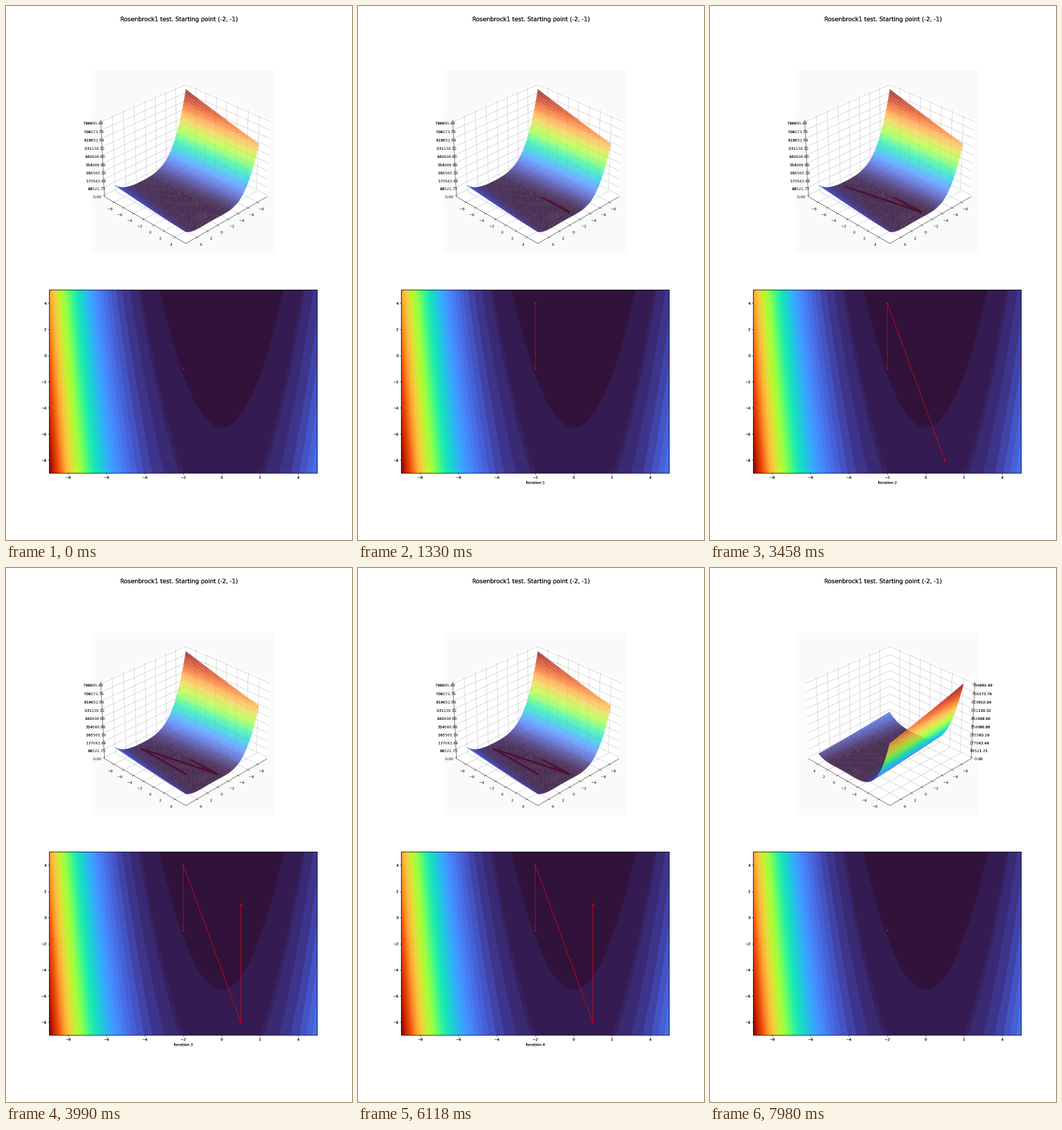
These frames come from a looping animation (603x928 px, 8000 ms). A matplotlib script:

```python
import numpy as np
import matplotlib.pyplot as plt
from matplotlib.animation import FuncAnimation
from matplotlib.artist import Artist

WIDTH, HEIGHT, DPI = 603, 928, 64
FINE = 2                   # scenes are drawn larger, then averaged down
S = 0.725                  # scale of points on this stage
LOOP, STEP, HOLD = 8000, 20, 1330
LAYERS = 4                 # axes stacked on each other thicken the outer text
LOW, HIGH = -9, 5
ZMAX = 9 * 88521.7206
TITLE = "Rosenbrock1 test. Starting point (-2, -1)"
PATH = np.array([(-2, -1), (-2, 4), (1, -8), (1, 1)])
TICKS = range(-8, 5, 2)

plt.rcParams.update({
    "font.family": "DejaVu Sans",
    "font.size": 10 * S,
    "axes.linewidth": 0.8 * S,
    "axes.labelpad": 4 * S,
    "grid.linewidth": 0.8 * S,
    **{f"{a}tick.major.{k}": v * S for a in "xy"
       for k, v in (("size", 3.5), ("pad", 3.5), ("width", 0.8))},
})


def cost(x, y):
    return 100 * (x**2 - y)**2 + (1 - x)**2


def mesh(low, n):
    line = np.linspace(low, HIGH, n)
    x, y = np.meshgrid(line, line)
    return x, y, cost(x, y)


def padded(low, high, part):
    pad = (high - low) * part
    return low - pad, high + pad


SURFACE = mesh(-8.96, 141)
FIELD = mesh(LOW, 300)
LEVELS = np.concatenate([[0, 3060, 16550, 19600, 32600],
                         np.arange(48800, 815000, 16270)])
XY_LIM = padded(*padded(LOW, HIGH, 0.05), 1 / 48)
Z_LIM = padded(0, ZMAX, 1 / 48)

fig = plt.figure(figsize=(WIDTH / DPI, HEIGHT / DPI), dpi=DPI)
fig.subplots_adjust(left=0.125, right=0.9, bottom=0.125, top=0.88, hspace=0.2)


def space_axes(azim):
    ax = fig.add_subplot(211, projection="3d", computed_zorder=False)
    ax.set_facecolor("0.98")
    ax.view_init(30, azim)
    for axis in (ax.xaxis, ax.yaxis, ax.zaxis):
        axis.set_pane_color((1, 1, 1, 1))
    ax.set_xticks(TICKS)
    ax.set_yticks(TICKS)
    ax.set_zticks(np.linspace(0, ZMAX, 10))
    ax.zaxis.set_major_formatter("{x:.2f}")
    ax.tick_params(pad=11.5 * S - 8)
    ax.set(xlim=XY_LIM, ylim=XY_LIM, zlim=Z_LIM)
    return ax


def plane_axes():
    ax = fig.add_subplot(212)
    ax.set(xlim=(LOW, HIGH), ylim=(LOW, HIGH), xticks=TICKS, yticks=TICKS)
    for spine in ax.spines.values():
        spine.set_linewidth(1.2 * S)
    return ax


def snapshot():
    """Return the drawn figure at stage size, bottom row first."""
    fig.canvas.draw()
    big = np.asarray(fig.canvas.buffer_rgba())
    blocks = big.reshape(HEIGHT, FINE, WIDTH, FINE, 4)
    small = blocks.mean(axis=(1, 3)) + 0.5
    return small.astype(np.uint8)[::-1].copy()


def render(azim, iterations):
    """Draw one view of the surface after each of the iterations."""
    fig.clear()
    planes = []
    for _ in range(LAYERS):
        space = space_axes(azim)
        planes.append(plane_axes())
        fig.text(0.5, 0.98, TITLE, size=16 * S, ha="center", va="top")

    trail, = space.plot([], [], [], "r-o", lw=5 * S, ms=4 * S, mew=0,
                        solid_capstyle="round", zorder=1)
    space.plot_surface(*SURFACE, rstride=1, cstride=1, cmap="turbo",
                       vmin=0, vmax=ZMAX, alpha=0.55, linewidth=0,
                       antialiased=False, zorder=2)
    space.set(xlim=XY_LIM, ylim=XY_LIM, zlim=Z_LIM)

    planes[-1].contourf(*FIELD, levels=LEVELS, cmap="turbo")
    route, = planes[-1].plot([], [], "r-o", lw=1.2 * S, ms=4 * S, mew=0)
    planes[-1].set(xlim=(LOW, HIGH), ylim=(LOW, HIGH))

    shots = []
    for i in iterations:
        x, y = PATH[:i + 1].T
        trail.set_data_3d(x, y, cost(x, y))
        route.set_data(x, y)
        for plane in planes:
            plane.set_xlabel(f"Iteration:{i}" if i else "")
        shots.append(snapshot())
    return shots


class Picture(Artist):
    """Shows ready pixels over the whole figure."""

    pixels = None

    def draw(self, renderer):
        gc = renderer.new_gc()
        renderer.draw_image(gc, 0, 0, self.pixels)
        gc.restore()


fig.set_dpi(DPI * FINE)
scenes = render(45, range(6)) + render(135, [0])
fig.clear()
fig.set_dpi(DPI)

picture = Picture()
picture.pixels = scenes[0]
fig.add_artist(picture)


def show(frame):
    picture.pixels = scenes[int((frame + 0.5) * STEP // HOLD)]
    return [picture]


anim = FuncAnimation(fig, show, frames=LOOP // STEP, interval=STEP,
                     repeat=True, cache_frame_data=False)
plt.show()
```
